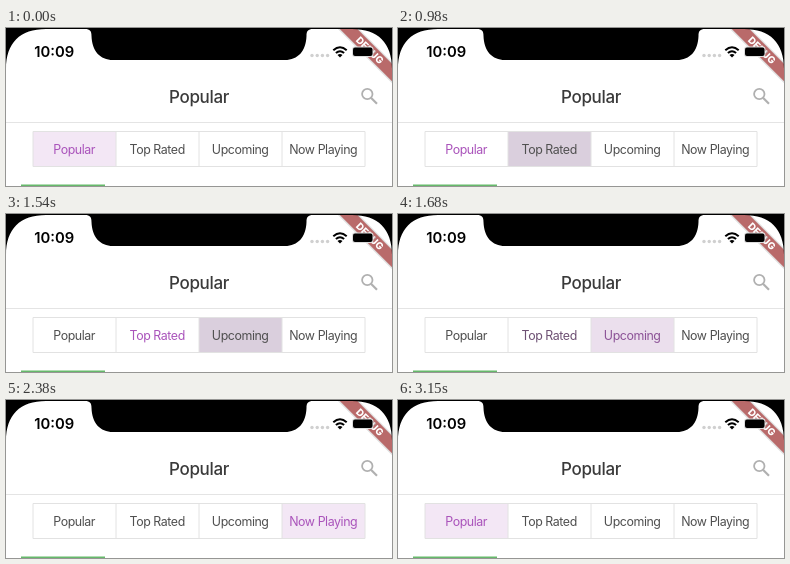
Animation, 386 px wide and 158 px high, one loop 3290 ms. Source, as an HTML page:

```html
<!DOCTYPE html>
<html lang="en">
<head>
<meta charset="utf-8">
<title>Segmented tabs</title>
<style>
  html, body { margin: 0; width: 100%; height: 100%; overflow: hidden; background: #fff; }
  svg { display: block; }
  text { font-family: Inter, "Open Sans", sans-serif; text-anchor: middle; }
  #tabs text { font-size: 12.4px; letter-spacing: -.43px; }
</style>
</head>
<body>
<svg width="386" height="158" viewBox="0 0 386 158">
  <rect width="386" height="158" fill="#fff"/>

  <!-- debug ribbon -->
  <g transform="translate(386 0) rotate(45)">
    <rect x="-46" y="24" width="92" height="15" fill="#000" opacity=".12"/>
    <rect x="-46" y="25.2" width="92" height="12.4" fill="#b96a6a"/>
    <text y="34.900" font-size="9.800" font-weight="800" fill="#fff">DEBUG</text>
  </g>

  <!-- screen corners and notch -->
  <path d="M0 0H386V41C386 15 372 1 346 1H307C302 1 300.500 3 300.500 8C300 23 292 32 279 32H107C94 32 86 23 85.500 8C85.500 3 84 1 79 1H40C14 1 0 15 0 41Z"/>

  <!-- status bar -->
  <text x="48.300" y="29.400" font-size="14.800" font-weight="600">10:09</text>
  <g fill="#d0d0d0">
    <circle cx="306" cy="27.500" r="1.700"/><circle cx="311.200" cy="27.500" r="1.700"/>
    <circle cx="316.400" cy="27.500" r="1.700"/><circle cx="321.600" cy="27.500" r="1.700"/>
  </g>
  <path d="M327.300 22.300Q334 16.300 340.700 22.300M329.900 25Q334 21.400 338.100 25" fill="none" stroke="#000" stroke-width="2"/>
  <path d="M331.500 26.900Q334 25 336.500 26.900L334 29.500Z"/>
  <rect x="346" y="18.500" width="21.500" height="10.500" rx="3" fill="#ddd"/>
  <rect x="347" y="19.500" width="19.500" height="8.500" rx="2"/>
  <path d="M368.500 22Q370.500 23.700 368.500 25.500Z" fill="#bbb"/>

  <!-- navigation bar -->
  <text x="193" y="75" font-size="17" font-weight="500" letter-spacing="-.35" fill="#3a3a3a">Popular</text>
  <g fill="none" stroke="#b0b0b0" stroke-width="1.800">
    <circle cx="361.300" cy="66" r="5.200"/>
    <path d="M365.200 70L371 75.800" stroke-width="2.200"/>
  </g>
  <path d="M0 94.500H386" stroke="#e4e4e4"/>

  <g id="tabs"></g>
  <path d="M27 103.500H359V138.500H27ZM110 104V138M193 104V138M276 104V138" fill="none" stroke="#e2e2e2"/>
  <circle id="touch" cy="121.500" fill="#777"/>
  <rect x="15" y="156.500" width="84" height="1.500" fill="#66b96b"/>
</svg>
<script>
const LOOP = 3290, STEP = 70, FADE = 210;
const GREY = [80, 80, 80], PURPLE = [170, 84, 187];
const PRESSED = [218, 207, 221], SELECTED = [243, 231, 245];

// Each tap: finger down, release, chosen tab, finger position
const taps = [
  { down: 840, up: 980, tab: 1, x: 151 },
  { down: 1400, up: 1540, tab: 2, x: 232 },
  { down: 1960, up: 2170, tab: 3, x: 324 },
  { down: 2660, up: 2940, tab: 0, x: 68 }
];

const svgNode = (name, attrs) => {
  const node = document.createElementNS("http://www.w3.org/2000/svg", name);
  for (const key in attrs) node.setAttribute(key, attrs[key]);
  return document.getElementById("tabs").appendChild(node);
};
const tabs = ["Popular", "Top Rated", "Upcoming", "Now Playing"].map((name, i) => {
  const box = svgNode("rect", { x: 27 + 83 * i, y: 103.5, width: 83, height: 35 });
  const label = svgNode("text", { x: 68.2 + 83 * i, y: 126 });
  label.textContent = name;
  return { box, label };
});
const touch = document.getElementById("touch");

const mix = (a, b, p) => `rgb(${a.map((v, i) => Math.round(v + (b[i] - v) * p))})`;

function draw(time) {
  const t = Math.floor(time % LOOP / STEP) * STEP;
  const last = taps.filter(tap => t >= tap.up).pop();
  const current = last ? last.tab : 0;
  const previous = last ? (current + 3) % 4 : -1;
  const p = last ? Math.min(1, (t - last.up) / FADE) : 1;

  tabs.forEach(({ box, label }, i) => {
    const active = i === current;
    box.setAttribute("fill", active ? mix(PRESSED, SELECTED, p) : "#fff");
    label.setAttribute("fill", active ? mix(GREY, PURPLE, p)
      : mix(PURPLE, GREY, i === previous ? p : 1));
  });

  const finger = taps.find(tap => t >= tap.down && t < tap.up);
  const grow = finger ? Math.min(1, (t - finger.down + STEP / 2) / 175) : 0;
  touch.setAttribute("r", 8 * grow);
  touch.setAttribute("opacity", .33 * grow);
  if (finger) touch.setAttribute("cx", finger.x);
}

const start = performance.now();
(function tick() {
  draw(performance.now() - start);
  requestAnimationFrame(tick);
})();
</script>
</body>
</html>
```
